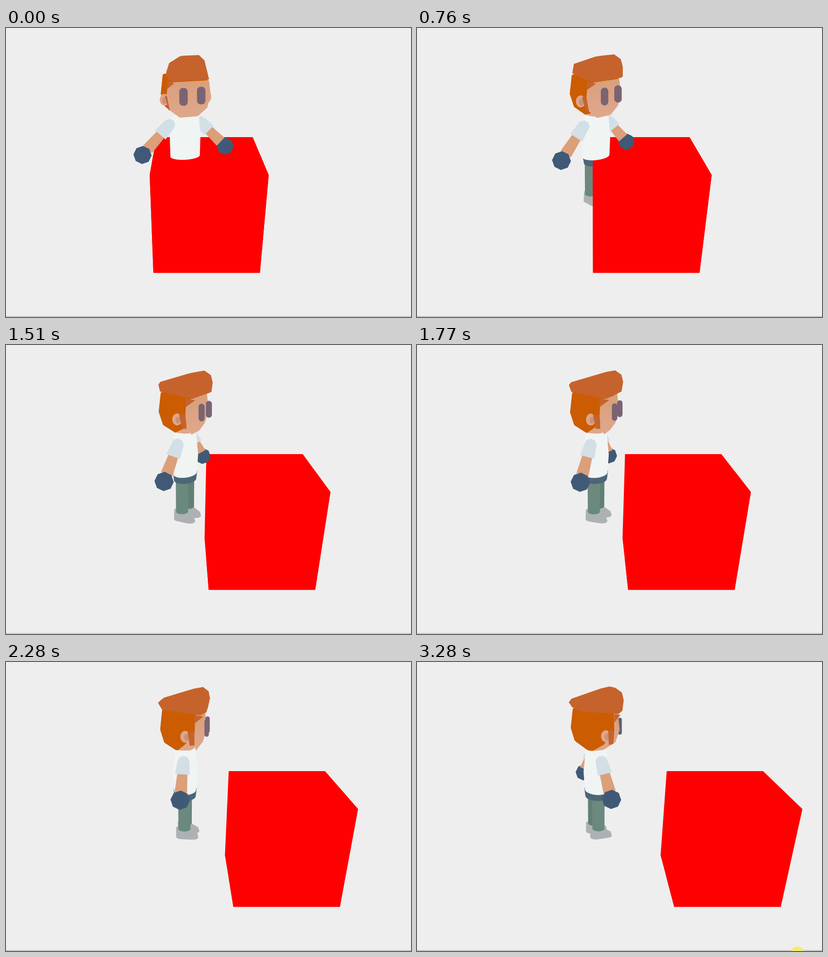
Animation, 885 px wide and 633 px high, one loop 3.41 s. Source, as an HTML page with a canvas:

```html
<!DOCTYPE html>
<html lang="en">
<head>
<meta charset="utf-8">
<title>Turning figure behind a red box</title>
<style>
  html, body { margin: 0; width: 100%; height: 100%; overflow: hidden; background: #eee; }
  canvas { display: block; width: 885px; height: 633px; }
</style>
</head>
<body>
<canvas id="stage" width="885" height="633"></canvas>
<script>
const ctx = document.getElementById('stage').getContext('2d');
const LOOP = 3410, STEPS = 27;
const AXIS = 391.5, HORIZON = 316;
const ARM = '#db9f79', GLOVE = '#405977', SLEEVE = '#d3dfe6', SHIRT = '#f0f4f3', BELT = '#4b6678',
  SHOE = '#aeb1b4', HAIR = '#cb5c02', FRINGE = '#c6632c', EAR = '#e0a58c', EAR_INNER = '#c99375';
const SKIN = fade('#d9a07d', '#dfa78a', 115, 190);
const TROUSERS = fade('#70887d', '#67897f', 300, 370);

let sin, cos; // of the figure's yaw; 0 faces the viewer, 90 degrees faces right

function fade(top, bottom, y0, y1) {
  const g = ctx.createLinearGradient(0, y0, 0, y1);
  g.addColorStop(0, top);
  g.addColorStop(1, bottom);
  return g;
}

// Figure space: a = sideways to its right arm, y = down, c = forward.
function project([a, y, c]) {
  const z = a * sin + c * cos, s = 1 + 0.0011 * z;
  return [AXIS + (c * sin - a * cos) * s, HORIZON + (y + 0.38 * z - HORIZON) * s, s];
}

function hull(points) {
  const sorted = [...points].sort((p, q) => p[0] - q[0] || p[1] - q[1]);
  const half = list => {
    const out = [];
    for (const p of list) {
      while (out.length > 1) {
        const [q, r] = out.slice(-2);
        if ((r[0] - q[0]) * (p[1] - q[1]) > (r[1] - q[1]) * (p[0] - q[0])) break;
        out.pop();
      }
      out.push(p);
    }
    return out.slice(0, -1);
  };
  return [...half(sorted), ...half(sorted.reverse())];
}

function fill(color, points) {
  ctx.beginPath();
  points.forEach(p => ctx.lineTo(p[0], p[1]));
  ctx.fillStyle = color;
  ctx.fill();
}
const solid = (color, points) => fill(color, hull(points.map(project)));

function oval(color, x, y, rx, ry) {
  ctx.beginPath();
  ctx.ellipse(x, y, rx, ry, 0, 0, 7);
  ctx.fillStyle = color;
  ctx.fill();
}

// Horizontal ring; a higher power makes it squarer.
function ring(y, ra, rc, a = 0, c = 0, power = 2) {
  const bend = v => Math.sign(v) * Math.abs(v) ** (2 / power);
  return Array.from({ length: 24 }, (_, i) => {
    const t = i * Math.PI / 12;
    return [a + ra * bend(Math.cos(t)), y, c + rc * bend(Math.sin(t))];
  });
}

function octagon([x, y, s], r) {
  return Array.from({ length: 8 }, (_, i) => {
    const t = i * Math.PI / 4 + 0.06;
    return [x + r * s * Math.sin(t), y - r * s * Math.cos(t)];
  });
}

// The two corners at "at" of a bar running from p to q.
function across(p, q, at, w) {
  const dx = q[0] - p[0], dy = q[1] - p[1], k = w * at[2] / Math.hypot(dx, dy);
  return [[at[0] - dy * k, at[1] + dx * k], [at[0] + dy * k, at[1] - dx * k]];
}

// The box slides sideways; "from" trims it from the back.
function box(slide, from) {
  const corners = [];
  for (const side of [-130, 130]) for (const low of [0, 1]) for (const back of [0, 1 - from]) {
    const k = 1 / (1 + 0.235 * back + 0.117 * low);
    corners.push([AXIS - 0.5 + (53 + slide + side) * k, HORIZON + (6 - 101 * back + 240 * low) * k]);
  }
  fill('#f00', hull(corners));
}

function leg(side) {
  const a = 15 * side;
  solid(SHOE, [...ring(357, 10, 12, a, -6), ...ring(376, 12, 12, a, -6),
    ...ring(369, 10, 10, a, 18), ...ring(376, 12, 12, a, 18)]);
  return () => solid(side < 0 ? '#617f75' : TROUSERS,
    [...ring(295, 13.5, 13.5, a), ...ring(359, 13, 13, a)]);
}

function arm(side) {
  const [shoulder, elbow, wrist, hand] =
    [[36, 209], [56, 229], [84, 257], [95, 268]].map(([a, y]) => project([a * side, y, 0]));
  const glove = () => fill(GLOVE, octagon(hand, 19.3));
  if (side < 0) glove();
  fill(SLEEVE, hull([...octagon(shoulder, 13), ...across(shoulder, elbow, elbow, 15)]));
  fill(ARM, hull([...across(elbow, hand, elbow, 10.5), ...across(elbow, hand, wrist, 12.5)]));
  if (side > 0) glove();
}

function skull(top, clip) {
  return [[top, 46], [145, 50], [172, 42], [189, 20]].flatMap(([y, r]) =>
    ring(y, r, r, 0, -3, 3).map(([a, , c]) => [a, y, clip(c, y)]));
}

function eyes() {
  for (const a of [-19.5, 19.5]) {
    const [x, y, s] = project([a, 140, 48]);
    const w = 8.5 + 10.5 * Math.max(cos, 0), h = 37 * s;
    ctx.beginPath();
    ctx.roundRect(x - w / 2, y - h / 2, w, h, Math.min(w / 2, 8));
    ctx.fillStyle = cos > 0 ? '#7a6473' : '#5d6272';
    ctx.fill();
  }
}

function ear(side) {
  const [x, y] = project([48 * side, 153, 5]);
  oval(EAR, x, y, 10.5, 13);
  if (side < 0) return;
  const inner = project([49, 154, 8]);
  oval(EAR_INNER, inner[0], inner[1], 5.5, 7.5);
}

function head() {
  const away = cos < 0;
  const hairline = y => 25 - Math.max(0, y - 150);
  ear(-1);
  if (away) eyes();
  solid(SKIN, skull(104, c => c));
  solid(HAIR, skull(104, (c, y) => Math.min(c, hairline(y))));
  if (!away) solid(SKIN, skull(113, c => Math.max(c, 25)));
  solid(FRINGE, [[47, 108, 24], [47, 126, 24], [38, 112, 42]]);
  ear(1);
  solid(FRINGE, [[49, 142, 10], [48, 142, 24], [42, 172, 24], [42, 173, 14]]);
  if (!away) eyes();

  // Swept-back top: forward position, height, half width.
  const sweep = [[-57, 88, 18], [-50, 81, 22], [17, 60, 18], [38, 56, 18], [50, 66, 26],
    [53, 82, 29], [48, 104, 34], [36, 109, 42], [0, 104, 43], [-46, 101, 30]];
  solid(FRINGE, sweep.flatMap(([c, y, w]) => [[w, y, c], [-w, y, c]]));
}

function draw(now) {
  const step = Math.min(STEPS - 1, Math.floor((now % LOOP + 8) * STEPS / LOOP));
  const slide = 12.05 * step - 0.067 * step * step;
  const yaw = (18.3 + 4.05 * step - 0.022 * step * step) * Math.PI / 180;
  sin = Math.sin(yaw);
  cos = Math.cos(yaw);

  ctx.fillStyle = '#eee';
  ctx.fillRect(0, 0, 885, 633);

  // The figure stands halfway into the box.
  box(slide, 0);
  for (const side of [-1, 1]) leg(side)();
  solid(BELT, [...ring(278, 32, 25), ...ring(294, 29, 23)]);
  box(slide, 0.5);

  arm(-1);
  solid(SHIRT, [...ring(194, 31, 22), ...ring(240, 34, 27), ...ring(280, 33, 24)]);
  arm(1);
  head();

  ctx.fillStyle = '#b9b9b9';
  ctx.fillRect(0, 631, 885, 1.5);
  // Pointer highlight peeking in on the last step.
  if (step === STEPS - 1) oval('#f5ec74', 831, 638, 15, 15);
}

function tick() {
  draw(performance.now());
  requestAnimationFrame(tick);
}
tick();
</script>
</body>
</html>
```
